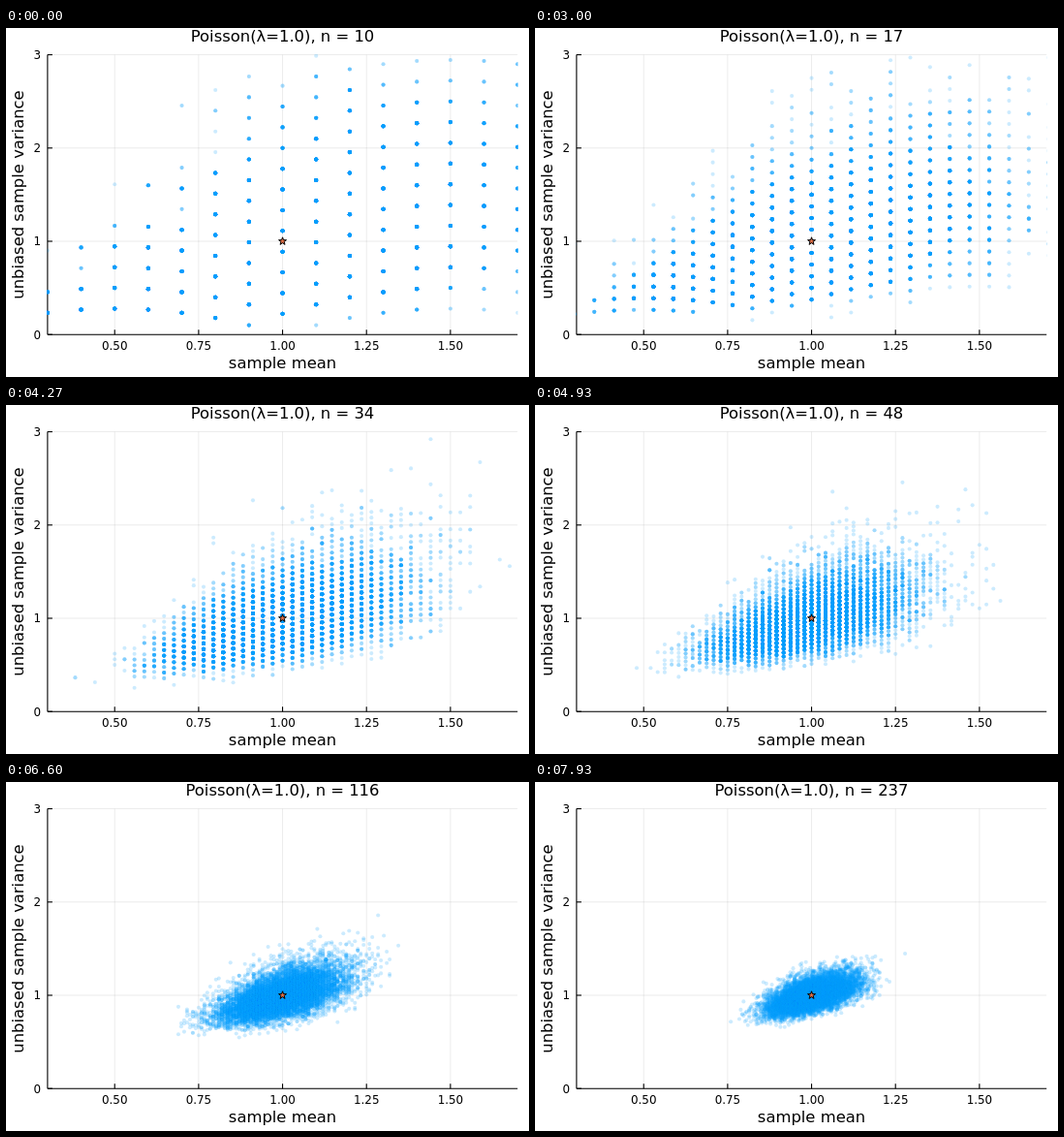
An HTML page with a canvas that plays this animation: 540 by 360 pixels, repeating every 8000 ms.

```html
<!DOCTYPE html>
<html lang="en">
<head>
<meta charset="utf-8">
<title>Poisson sample statistics</title>
<style>
  html, body { margin: 0; width: 100%; height: 100%; overflow: hidden; background: #fff; }
  canvas { display: block; }
</style>
</head>
<body>
<canvas id="plot" width="540" height="360"></canvas>
<script>
const ctx = document.getElementById('plot').getContext('2d');

const LOOP = 8000;
const TRIALS = 10000;
const HOLD = 30;          // steps before n starts to grow
const GROWTH = 0.03557;   // log growth of n per step
const BOX = { left: 42.9, right: 528.2, top: 27.6, bottom: 316.2 };
const FONT = '"DejaVu Sans", sans-serif';

const px = v => BOX.left + (v - 0.3) / 1.4 * (BOX.right - BOX.left);
const py = v => BOX.bottom - v / 3 * (BOX.bottom - BOX.top);

// Inverse distribution table for Poisson(1)
const BITS = 20;
const table = new Uint8Array(1 << BITS);
{
  let value = 0, p = Math.exp(-1), cdf = p;
  for (let i = 0; i < table.length; i++) {
    while ((i + 0.5) / table.length > cdf && value < 12) {
      p /= ++value;
      cdf += p;
    }
    table[i] = value;
  }
}

function sampleSize(step) {
  return Math.round(10 * Math.exp(GROWTH * Math.max(0, step - HOLD)));
}

// Counts how often each pair (sum, sum of squares) occurs
function simulate(n, step) {
  let r = Math.imul(step + 1, 0x9E3779B9) | 0;
  const counts = new Map();
  for (let t = -20; t < TRIALS; t++) {
    let sum = 0, squares = 0;
    for (let i = 0; i < n; i++) {
      r ^= r << 13;
      r ^= r >>> 17;
      r ^= r << 5;
      const v = table[r >>> (32 - BITS)];
      sum += v;
      squares += v * v;
    }
    if (t < 0) continue;   // warm-up
    const key = sum * 4096 + squares;
    counts.set(key, (counts.get(key) || 0) + 1);
  }
  return counts;
}

function line(x1, y1, x2, y2) {
  ctx.beginPath();
  ctx.moveTo(x1, y1);
  ctx.lineTo(x2, y2);
  ctx.stroke();
}

function label(text, x, y, size, align = 'center') {
  ctx.font = `${size}px ${FONT}`;
  ctx.textAlign = align;
  ctx.fillText(text, x, y);
}

function drawAxes(n) {
  const xTicks = [0.5, 0.75, 1, 1.25, 1.5];
  const yTicks = [0, 1, 2, 3];

  ctx.lineWidth = 0.8;
  ctx.strokeStyle = 'rgba(0,0,0,0.1)';
  for (const v of xTicks) line(px(v), BOX.top, px(v), BOX.bottom);
  for (const v of yTicks) line(BOX.left, py(v), BOX.right, py(v));

  ctx.lineWidth = 1.1;
  ctx.strokeStyle = ctx.fillStyle = '#000';
  line(BOX.left, BOX.top, BOX.left, BOX.bottom);
  line(BOX.left, BOX.bottom, BOX.right, BOX.bottom);
  for (const v of xTicks) {
    line(px(v), BOX.bottom, px(v), BOX.bottom - 5);
    label(v.toFixed(2), px(v), 331.5, 11.9);
  }
  for (const v of yTicks) {
    line(BOX.left, py(v), BOX.left + 5, py(v));
    label(v, 36, py(v) + 4.4, 11.9, 'right');
  }

  label(`Poisson(λ=1.0), n = ${n}`, 285.5, 14.2, 16.4);
  label('sample mean', 285.5, 351, 16.4);
  ctx.save();
  ctx.translate(18, 172);
  ctx.rotate(-Math.PI / 2);
  label('unbiased sample variance', 0, 0, 16.4);
  ctx.restore();
}

function drawDots(n, step) {
  ctx.save();
  ctx.beginPath();
  ctx.rect(42.5, 27, 486, 289.7);
  ctx.clip();
  ctx.fillStyle = 'rgba(0,154,250,0.2)';
  for (const [key, count] of simulate(n, step)) {
    const sum = Math.floor(key / 4096);
    const squares = key % 4096;
    const mean = sum / n;
    const variance = (squares - sum * mean) / (n - 1);
    if (variance > 3.1 || mean < 0.28 || mean > 1.72) continue;
    ctx.beginPath();
    ctx.arc(px(mean), py(variance), 2.05, 0, 2 * Math.PI);
    // Repeated fills saturate, so more than 40 look the same
    for (let i = Math.min(count, 40); i > 0; i--) ctx.fill();
  }
  ctx.restore();
}

function drawStar(x, y, radius) {
  ctx.beginPath();
  for (let i = 0; i < 10; i++) {
    const a = i * Math.PI / 5 - Math.PI / 2;
    const d = i % 2 ? radius * 0.4 : radius;
    ctx.lineTo(x + d * Math.cos(a), y + d * Math.sin(a));
  }
  ctx.closePath();
  ctx.fillStyle = '#e26f46';
  ctx.strokeStyle = '#000';
  ctx.lineWidth = 1;
  ctx.fill();
  ctx.stroke();
}

function draw(step) {
  const n = sampleSize(step);
  ctx.fillStyle = '#fff';
  ctx.fillRect(0, 0, 540, 360);
  drawAxes(n);
  drawDots(n, step);
  drawStar(px(1), py(1), 4.2);
}

// 15 steps per second, each starting on a multiple of 10 ms
function stepAt(t) {
  const step = Math.round(t * 0.015);
  return t < Math.round(step * 20 / 3) * 10 ? step - 1 : step;
}

let shown = -1;
function tick() {
  const step = stepAt(performance.now() % LOOP);
  if (step !== shown) draw(shown = step);
  requestAnimationFrame(tick);
}
tick();
</script>
</body>
</html>
```
